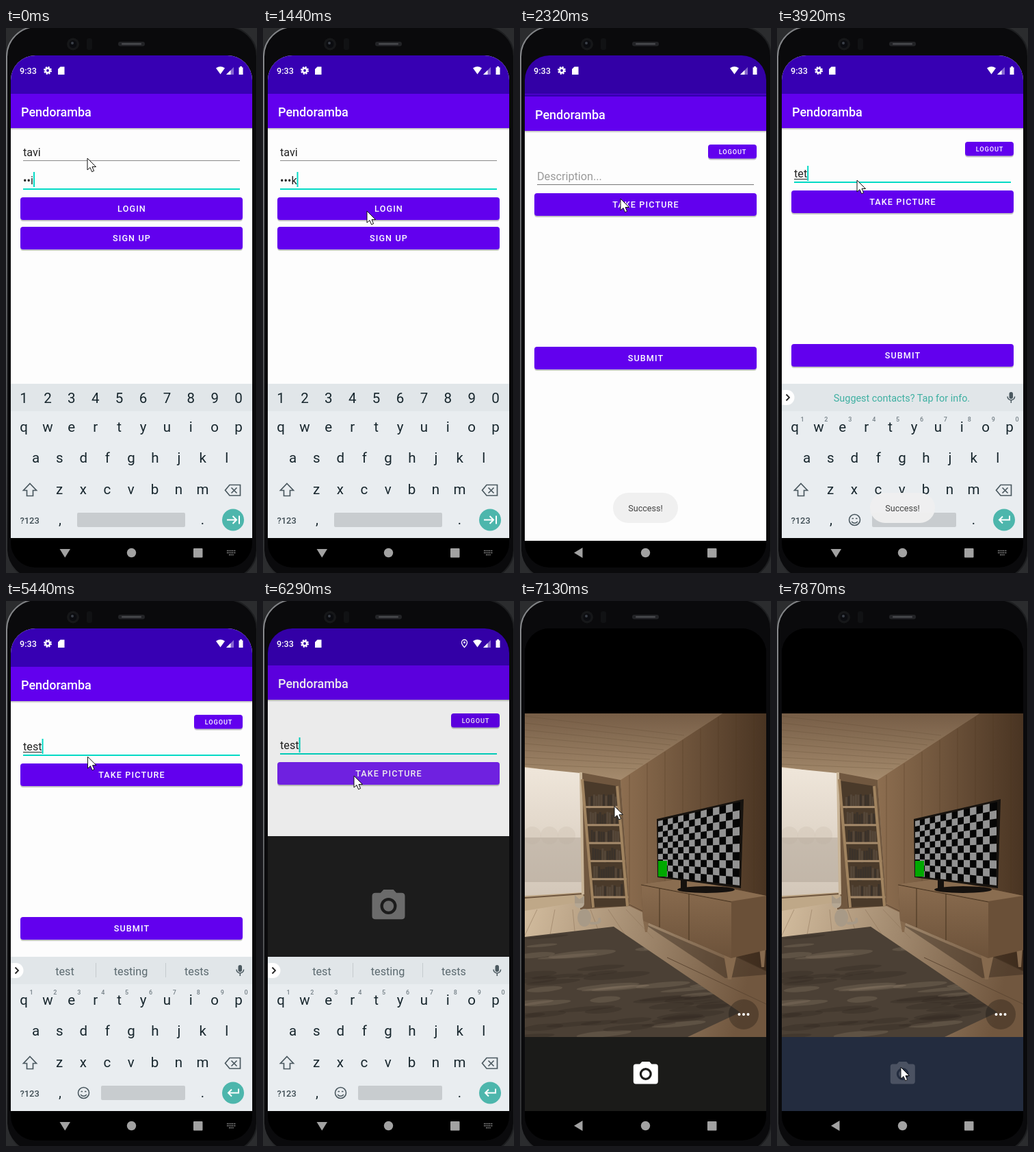
An HTML page for the animation above (7.99 s loop, 367 px wide and 795 px high).

```html
<!DOCTYPE html>
<html lang="en">
<head>
<meta charset="utf-8">
<title>Phone demo</title>
<style>
  html, body { margin: 0; width: 100%; height: 100%; overflow: hidden; background: #2b2c2e; }
  svg { display: block; width: 100%; height: 100%; }
  text { font-family: Roboto, "Noto Sans", sans-serif; white-space: pre; }
  .m { font-weight: 500; }
</style>
</head>
<body>
<svg id="stage" viewBox="0 0 367 795"></svg>
<script>
const LOOP = 7990, STEP = 123, LEAD = 40;   // the screen refreshes once per STEP ms
const PURPLE = '#6200ee', DEEP = '#3700b3', TEAL = '#03dac5', INK = '#17262d', ICON = '#4b5960', WOOD = '#b5987a';

// ---- drawing helpers ----
const rect = (x, y, w, h, fill, rx = 0, more = '') =>
  `<rect x="${x}" y="${y}" width="${w}" height="${h}" fill="${fill}" rx="${rx}" ${more}/>`;
const oval = (x, y, rx, ry, fill, more = '') => `<ellipse cx="${x}" cy="${y}" rx="${rx}" ry="${ry}" fill="${fill}" ${more}/>`;
const circ = (x, y, r, fill, more = '') => `<circle cx="${x}" cy="${y}" r="${r}" fill="${fill}" ${more}/>`;
const poly = (pts, fill, more = '') => `<polygon points="${pts}" fill="${fill}" ${more}/>`;
const path = (d, fill, more = '') => `<path d="${d}" fill="${fill}" ${more}/>`;
const line = (d, color, w = 1, more = '') => path(d, 'none', `stroke="${color}" stroke-width="${w}" ${more}`);
const text = (x, y, s, size, fill, more = '') =>
  `<text x="${x}" y="${y}" font-size="${size}" fill="${fill}" ${more}>${s}</text>`;
const mid = (x, y, s, size, fill, more = '') => text(x, y, s, size, fill, 'text-anchor="middle" ' + more);
const group = (id, body, more = '') => `<g id="${id}" ${more}>${body}</g>`;
const clipped = (name, body) => `<g clip-path="url(#${name})">${body}</g>`;
const grad = (id, from, to, dir = 'x2="0" y2="1"') => `<linearGradient id="${id}" ${dir}>` +
  `<stop stop-color="${from}"/><stop offset="1" stop-color="${to}"/></linearGradient>`;
const clip = (id, shape) => `<clipPath id="${id}">${shape}</clipPath>`;
const times = (n, f) => Array.from({ length: n }, (_, i) => f(i)).join('');
const mix = (a, b, k) => a + (b - a) * k;

let seed = 7;
const rnd = () => (seed = seed * 16807 % 2147483647) / 2147483647;

// ---- app screens ----
const button = (x, y, w, h, label, size, over = '') =>
  rect(x, y + 2, w, h, '#00000038', 4) + rect(x, y, w, h, PURPLE, 4) + over +
  mid(x + w / 2 + .5, y + h / 2 + size * .36, label, size, '#fff', `class="m" letter-spacing="${size * .0893}"`);
const wide = (y, label, over) => button(21, y, 325, 33, label, 12.6, over);
const ripple = (id, box) => clipped(box, circ(0, 0, 0, '#fff', `id="${id}" opacity=".14"`));

const bars = () =>
  rect(7, 10, 353, 734, '#fdfdfd') + rect(7, 146, 353, 3, 'url(#shade)') +
  rect(7, 10, 353, 86, DEEP) + rect(7, 96, 353, 50, PURPLE) +
  text(22, 128.5, 'Pendoramba', 18, '#fff', 'class="m"');

const login = () => bars() +
  text(25, 187, 'tavi', 16.2, '#222') + rect(25, 193, 317, 1, '#8a8a8a') +
  text(25, 227.5, '', 16.2, '#222', 'id="pass"') + rect(25, 234, 317, 2, TEAL) +
  rect(0, 210, 2, 22, TEAL, 0, 'id="passCaret"') +
  wide(247, 'LOGIN', ripple('loginRipple', 'loginClip')) + wide(290, 'SIGN UP');

const post = () => bars() +
  button(275, 166, 71, 20.5, 'LOGOUT', 9.25) +
  text(25, 218, 'Description...', 16.2, '#9a9a9a', 'id="hint"') +
  text(25, 218, '', 16.2, '#222', 'id="desc"') +
  rect(25, 220, 0, 1, '#222', 0, 'id="compose"') +
  rect(25, 224, 317, 1, '#777', 0, 'id="descLine"') +
  rect(0, 201, 2, 22, TEAL, 0, 'id="descCaret"') +
  wide(237, 'TAKE PICTURE', ripple('picRipple', 'picClip')) + wide(461, 'SUBMIT');

// ---- keyboard ----
const row = (s, x, y, size = 20.5, fill = INK, more) =>
  [...s].map((c, i) => mid(x + i * 34.9, y, c, size, fill, more)).join('');
const DIGITS = '1234567890';

const keys = () =>
  rect(7, 519, 353, 225, '#e9edf0') + rect(7, 519, 353, 40, '#e1e6e9') +
  row('qwertyuiop', 26, 589) + row('asdfghjkl', 43.5, 634) + row('zxcvbnm', 78, 679.5) +
  line('M35 664.5l9.5 10h-5v8h-9v-8h-5z', ICON, 1.7) +
  line('M327 666.5h15.5v15.5h-15.5l-6.5-7.75zM329.5 670.5l8 8m0-8l-8 8', ICON, 1.7) +
  text(20.5, 722.5, '?123', 12.9, '#3f4d54', 'class="m"') + mid(79, 724, ',', 20, INK) + mid(287.5, 724, '.', 20, INK) +
  circ(332, 717.5, 16, '#4db6ac') +
  group('numKeys', row(DIGITS, 26, 547) + rect(104, 707, 158, 21, '#c8cccf', 2) +
    line('M323 717.5h14m-5.5-5.5l5.5 5.5l-5.5 5.5M341 711.5v12', '#fff', 2)) +
  group('wordKeys', row(DIGITS, 37, 574, 9, '#758087', 'class="m"') + rect(139, 707, 123, 21, '#c8cccf', 2) +
    line('M121.5 717.5a8 8 0 1 0-16 0a8 8 0 1 0 16 0M109 720q4.5 4.5 9 0M109.500 715.500h2.500m3 0h2.500', ICON, 1.6) +
    line('M340 711.5v6h-15m5-5l-5 5l5 5', '#fff', 2) +
    rect(0, 528, 25.5, 22, '#fff', 11) + line('M13.5 534.5l4.5 4.5l-4.5 4.5', '#222', 1.8) +
    rect(339.5, 531, 5.5, 10, ICON, 2.7) + line('M337 537.5a5.300 5.300 0 0 0 10.600 0M342.300 543v4', ICON, 1.5) +
    group('tip', mid(182.5, 545, 'Suggest contacts? Tap for info.', 14.4, '#3fb0a2')) +
    group('words', ['test', 'testing', 'tests'].map((w, i) => mid(86 + i * 96.5, 545.5, w, 16.2, '#5c6a70')).join('') +
      line('M131.500 528v21m102 0v-21', '#c5cbce')));

// ---- camera ----
const cam = (id, x, y, k) => group(id,
  path('M9 2L7.2 4H4q-2 0-2 2v12q0 2 2 2h16q2 0 2-2V6q0-2-2-2h-3.2L15 2zM12 17a5 5 0 0 1 0-10a5 5 0 0 1 0 10z', '#fff') +
  circ(12, 12, 3.2, '#fff'), `transform="translate(${x - 12 * k} ${y - 12 * k}) scale(${k})"`);

// Checkered picture on the tilted television, 14 by 10 cells.
function checker() {
  const pt = (i, j) => {
    const v = j / 10, s = i / 14, u = s * (.8 + .2 * s);
    return `${mix(202, 321, u).toFixed(1)} ${mix(mix(321, 293, u), mix(401, 415, u), v).toFixed(1)}`;
  };
  let d = '';
  for (let i = 0; i < 14; i++) for (let j = i % 2; j < 10; j += 2)
    d += `M${pt(i, j)}L${pt(i + 1, j)}L${pt(i + 1, j + 1)}L${pt(i, j + 1)}z`;
  return path(d, '#929292');
}

const shelf = () => poly('92,262 142,270 158,445 104,447', '#4a3a2a') +
  times(6, n => {
    const x = 97 + n * 1.8, y = 299 + n * 26.3;
    return times(12, b => rect(x + 3 + b * 3.5, y - 13 - rnd() * 5, 2.9, 17, rnd() < .5 ? '#3b322a' : '#554739')) +
      rect(x - 1, y, 50 + n * .7, 3, '#a58a6b');
  }) + line('M91 260L107 447M142 270L157 445', '#a0835f', 4);

const planks = () => times(8, i =>
  line(`M7 ${168 + i * 10}L${240 - i * 10} ${196 + i * 7}`, '#5a432f', 1, 'opacity=".25"') +
  line(`M${160 + i * 26} ${254 - i * 17}V${440 + i * 10}`, '#4a3421', 1, 'opacity=".35"') +
  line(`M${25 + i * 26} 450L${5 + i * 38} 492`, '#8a7056', 1, 'opacity=".5"'));

const rug = () => rect(7, 470, 330, 170, '#4b4035') + times(50, () => {
  const y = 480 + rnd() * 150, lit = Math.sin(y / 11) > .2;
  return oval(rnd() * 290, y, 20 + rnd() * 30, 2 + rnd() * 3, lit ? '#8b7a66' : '#2f261e',
    `opacity=".3" transform="rotate(-5 150 ${y})"`);
});

const cat = () => line('M104 470q15 1 12-6', '#a89a87', 4, 'stroke-linecap="round"') +
  oval(94, 462, 10, 13, '#a89a87') + circ(87, 441, 7, '#b5a793') + path('M80 441v-12l7 6l7-5v11z', '#a89a87');

const room = () => clipped('roomClip',
  rect(7, 164, 353, 472, 'url(#floor)') +
  poly('7,164 296,164 147,261 7,242', 'url(#ceil)') +
  poly('296,164 360,164 360,540 160,445 147,261', 'url(#wall)') +
  poly('88,250 147,261 160,445 88,450', '#70573f') +
  planks() +
  poly('7,243 88,251 91,427 7,434', 'url(#sky)') +
  times(3, i => circ(18 + i * 25, 342, 13, '#cfc3b5', 'opacity=".4"')) +
  rect(7, 345, 83, 65, '#b0a396', 0, 'opacity=".5"') +
  poly('7,430 92,425 94,438 7,452', '#bfa888') + line('M7 433L92 427', '#6f563e', 2) + line('M89 250L92 428', '#c9b598', 4) +
  line('M160 443L360 540M215 520L360 588', '#5d4733') + shelf() +
  clipped('rugClip', rug()) +
  poly('180,470 300,522 360,510 360,545 300,550', '#2c1f14', 'opacity=".4"') +
  path('M180 466l8 3l-2 14h-3zM350 506h9l-2 28h-4zM298 516h19l-8 36h-5z', '#866a4e') +
  poly('177,413 238,405 360,430 360,509 309,521 180,466', '#6a5038') +
  poly('177,413 238,405 360,430 309,438', '#8a6d50') + poly('177,413 309,438 309,521 180,466', 'url(#cab)') +
  line('M204 419V476M247 427V495M177 414L309 439', '#45321f') +
  oval(272, 421, 42, 5, '#15110e') + rect(235, 404, 9, 15, '#15110e') +
  poly('200,318 327,289 323,419 201,403', '#17130f') +
  poly('202,321 322,293 320,415 202,401', '#060606') + checker() + rect(202, 379, 13, 23, '#00a800') + cat());

const camera = () => rect(7, 30, 353, 720, '#000') + room() +
  rect(7, 636, 353, 110, '#1b1b19') + clipped('barClip', circ(183.5, 690, 0, '#232c3f', 'id="press"')) +
  cam('shutter', 183.8, 690, 1.8) +
  circ(327, 603, 22, '#000', 'opacity=".25"') + times(3, i => circ(320.5 + i * 6.5, 603, 2, '#fff')) +
  rect(7, 97, 353, 660, '#1c1c1c', 0, 'id="veil"') + cam('splash', 183.5, 420, 2.4);

// ---- phone ----
const status = () => text(20, 67, '9:33', 12.6, '#fff', 'class="m"') +
  circ(61, 62, 3.2, 'none', 'stroke="#fff" stroke-width="2.6"') +
  circ(61, 62, 5, 'none', 'stroke="#fff" stroke-width="2" stroke-dasharray="2.2 1.727"') +
  path('M79.5 56.5h6v11.5h-9.5v-8z', '#fff') + path('M307 58.5q6.5-4.5 13 0L313.5 67.5z', '#fff') +
  path('M333 57v11h-11z', '#fff', 'opacity=".4"') + path('M328.5 61.5v6.5h-6.5z', '#fff') +
  path('M340.500 57.500h1.500v-1.500h3v1.500h1.500v10.500h-6z', '#fff') +
  group('pin', line('M294.500 67.500q-4-4-4-7a4 4 0 0 1 8 0q0 3-4 7z', '#fff', 1.3) + circ(294.5, 60.5, 1.4, '#fff'));

const nav = () => path('M78.5 760h15.5l-7.75 12.5z', '#a2a2a2', 'id="navDown"') +
  path('M91.5 758v15l-12.500-7.500z', '#a2a2a2', 'id="navLeft"') +
  circ(183.5, 765.5, 6.7, '#a2a2a2') + rect(274, 759, 13.5, 13.5, '#a2a2a2', 1) +
  line('M323 762.5h13M323 765.5h13M326 768.5h7', '#999', 1.5, 'id="navKeys" stroke-dasharray="1.5 1"');

const body = () => rect(0, 0, 367, 795, '#2b2c2e') +
  rect(1, -2, 366, 806, '#0a0a0c', 44, 'stroke="url(#rim)" stroke-width="2"') + rect(7, 40, 353, 747, '#000', 36) +
  circ(98, 23.5, 9, '#161719') + circ(98, 23.5, 5.5, '#0b0c10') + circ(97, 22, 2, '#3b4049') +
  rect(118, 15, 8, 17, '#111214', 3) + rect(164, 20, 39, 6.5, '#222326', 3) + rect(169, 22, 29, 2.5, '#48494d', 1);

const $ = id => document.getElementById(id);
$('stage').innerHTML = '<defs>' +
  grad('shade', '#b5b5b5', '#fdfdfd') + grad('rim', '#8a8c8f', '#1d1e20', 'x2=".5" y2=".3"') +
  grad('ceil', '#765d46', '#a58b6d') + grad('wall', '#8d6e50', '#493422', 'x2="1" y2="0"') +
  grad('floor', '#d2bc9e', '#71573f', 'y1=".6" x2=".9" y2=".9"') +
  grad('sky', '#efe6da', '#d2c6b8') + grad('cab', '#8a6c4f', '#6c523a') +
  clip('screen', rect(7, 40, 353, 747, '', 36)) + clip('roomClip', rect(7, 164, 353, 472)) + clip('barClip', rect(7, 636, 353, 108)) +
  clip('loginClip', rect(21, 247, 325, 33, '', 4)) + clip('picClip', rect(21, 237, 325, 33, '', 4)) +
  clip('postClip', rect(7, 0, 353, 795, '', 0, 'id="postEdge"')) + clip('camClip', rect(7, 0, 353, 744, '', 0, 'id="camEdge"')) +
  clip('rugClip', poly('7,490 137,475 322,600 245,636 7,636')) + '</defs>' +
  body() + clipped('screen',
    group('login', login()) +
    group('postWrap', group('post', post()), 'clip-path="url(#postClip)"') +
    group('camWrap', group('camera', camera()), 'clip-path="url(#camClip)"') +
    group('keyboard', keys()) +
    group('toast', rect(136, 678, 95, 44, '#f0f0f0', 22) + mid(183.5, 705, 'Success!', 12.6, '#3c3c3c')) +
    group('status', status()) + nav()) +
  group('cursor', path('M0 0V17l4-3.5l2.6 6.2l3-1.3l-2.600-5.900h5.500z', '#fff', 'stroke="#111"'));

// ---- motion, counted in screen refreshes ----
const part = (s, a, b) => Math.min(1, Math.max(0, (s - a) / (b - a)));
const ease = p => p * p * (3 - 2 * p);
const last = (s, list) => list.filter(e => e[0] <= s).pop()[1];
const within = (s, a, b) => s >= a && s < b;

const show = (id, on) => $(id).setAttribute('visibility', on ? 'inherit' : 'hidden');
const set = (id, attrs) => { for (const k in attrs) $(id).setAttribute(k, attrs[k]); };
const shift = (id, y, x = 0) => set(id, { transform: `translate(${x} ${y})` });

// Moves of the pointer: from, to, x, y.
const MOVES = [[5, 12, 152, 267], [13, 18, 147, 249], [21, 29, 117, 222], [43, 47, 133, 255], [57, 62, 181, 680]];
const DESC = [[0, ''], [26, 't'], [27, 'te'], [29, 'tet'], [33, 'te'], [34, 'tes'], [35, 'test']];
const PRESS = { login: 13, post: 18, focus: 25, type: 26, pic: 47, camera: 51, shutter: 62 };

// A new screen settles upwards while it is uncovered from below.
const rise = n => n < 0 ? 25 : 25 * .16 ** n;
const edge = n => n < 0 ? 744 : 40 + 303 * .188 ** (n ** 1.4);
const spread = (id, n, x, y) => set(id, { cx: x, cy: y, r: n < 0 ? 0 : Math.min(230, 30 + 100 * n) });

function draw(s) {
  let x = 119, y = 190;
  for (const [a, b, tx, ty] of MOVES) {
    const p = ease(part(s, a, b));
    x = mix(x, tx, p);
    y = mix(y, ty, p);
  }
  shift('cursor', y, x);

  const { post, focus, type, camera } = PRESS;
  $('pass').textContent = s < 1 ? '••i' : '•••k';
  set('passCaret', { x: s < 1 ? 40 : 49.5 });
  show('passCaret', s < 5 || within(s, 10, 14));
  spread('loginRipple', s - PRESS.login, 154, 265);
  show('login', s < post + 3);
  set('login', { opacity: s < post ? 1 : .93 });

  const word = last(s, DESC), on = s >= focus;
  show('postWrap', within(s, post, camera + 4));
  set('post', { opacity: s < camera ? 1 : .93 });
  shift('post', s < camera ? rise(s - post) : -2);
  set('postEdge', { y: edge(s - post) });
  $('desc').textContent = word;
  const width = $('desc').getComputedTextLength();
  show('hint', !word);
  set('compose', { width: s < 45 ? width : 0 });
  set('descLine', { height: on ? 2 : 1, fill: on ? TEAL : '#777' });
  set('descCaret', { x: 25 + width });
  show('descCaret', on);
  spread('picRipple', s - PRESS.pic, 135, 255);

  const veil = (1 - part(s, camera + 1, camera + 6)) ** 1.5, top = edge(s - camera);
  show('camWrap', s >= camera);
  shift('camera', rise(s - camera));
  set('camEdge', { y: top, height: 744 - top });
  set('veil', { opacity: veil });
  set('splash', { opacity: .35 * Math.sqrt(veil) });
  spread('press', s - PRESS.shutter, 183.5, 690);
  set('shutter', { opacity: mix(1, .18, part(s, 61, 63)) });

  const first = s <= post, open = first || within(s, type, camera + 1);
  const down = first || within(s, focus, camera + 1);
  show('keyboard', open);
  shift('keyboard', first ? 0 : 60 * (1 - part(s, type, type + 1)));
  show('numKeys', open && first);
  show('wordKeys', open && !first);
  show('tip', open && !first && s < 36);
  show('words', open && s >= 36);
  show('navDown', down);
  show('navLeft', !down);
  show('navKeys', down);

  show('toast', within(s, post + 1, 36));
  set('toast', { opacity: mix(.96, 0, part(s, 32, 35)) });
  show('pin', s >= 48);
  shift('status', -14.5 * Math.max(0, s - camera - 1));
}

let shown = -1;
function frame() {
  const s = Math.min(64, Math.floor((performance.now() % LOOP + LEAD) / STEP));
  if (s !== shown) draw(shown = s);
  requestAnimationFrame(frame);
}
frame();
</script>
</body>
</html>
```
